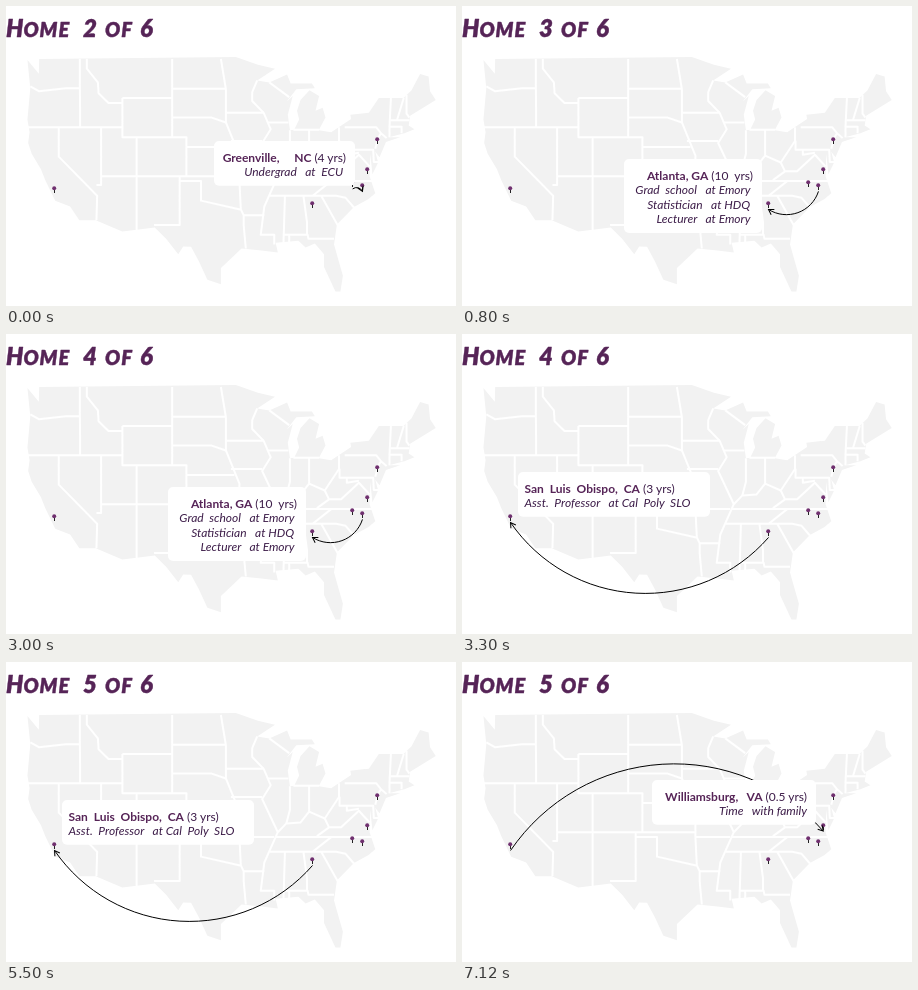
Recreate the animation shown at these times as an HTML page. Size 450 by 300 pixels, loop 8 s.

```html
<!DOCTYPE html>
<html lang="en">
<head>
<meta charset="utf-8">
<title>Home map</title>
<style>
  html, body { margin: 0; width: 100%; height: 100%; overflow: hidden; background: #fff; }
  svg { display: block; width: 450px; height: 300px; }
  text { font-family: Lato, sans-serif; font-size: 12px; fill: #3d1d49; white-space: pre; }
  .heading { font-weight: 900; font-style: italic; fill: #562457; stroke: #562457; stroke-width: .4; stroke-linejoin: round; }
  .big { font-size: 24px; }
  .small { font-size: 20px; letter-spacing: 1px; }
  .bold { font-weight: 700; fill: #562457; }
  .italic { font-style: italic; }
  .land { fill: #f2f2f2; }
  .border { fill: none; stroke: #fff; stroke-width: 2; stroke-linejoin: round; vector-effect: non-scaling-stroke; }
  .arrow { fill: none; stroke: #000; }
  .pin line { stroke: #222; shape-rendering: crispEdges; }
  .pin circle { fill: #70306f; }
</style>
</head>
<body>
<svg viewBox="0 0 450 300">
  <defs>
    <marker id="head" markerUnits="userSpaceOnUse" markerWidth="8" markerHeight="8" refX="6" refY="4" orient="auto">
      <path class="arrow" d="M1 1L6 4L1 7"/>
    </marker>
  </defs>
  <g id="map"></g>
  <g id="pins"></g>
  <g id="scenes"></g>
  <text class="heading" y="31"><tspan class="big" x="0">H</tspan><tspan class="small">OME</tspan><tspan class="big" x="77" id="count">2</tspan><tspan class="small" x="99">OF</tspan><tspan class="big" x="134">6</tspan></text>
</svg>
<script>
// The map is drawn in degrees west and north, with a flat projection to pixels.
const scale = { x: -7.113, y: -9.77, left: 906.3, top: 531.7 };
const project = ([west, north]) => [scale.left + scale.x * west, scale.top + scale.y * north];

const coast = [
  // northern border and lakes
  `124.4 48.9 122.8 47.5 122.75 49 95.1 49.2 92 48.4 89.6 48 92.1 46.8 90.4 46.6 87.9 47.4
   87.4 46.5 84.4 46.5 84 46 86.6 45.9 88 44.6 87.1 45.2 87.8 43.3 87.5 41.7 86.9 41.75
   86.2 42.8 86.5 43.7 86 44.8 84.75 45.8 83.4 45.2 83.9 43.7 82.9 44 82.5 43 83.45 41.7
   81.7 41.5 78.9 42.85 79 43.3 76.4 43.5 75 45`,
  // Atlantic
  `71.5 45 70.4 45.8 69.2 47.45 68 47.2 67.8 45.7 67 44.8 70.6 43.2 70.8 42.2 70 41.8
   71.4 41.4 73.6 41 72 41 74 40.5 74.9 38.95 75.5 39.5 75.1 38.4 75.9 37.2 76.2 39.3
   76.3 37 75.5 35.25 76.5 34.65 78.5 33.85 80.9 32.05 81.3 30 80.05 26.8 80.4 25.2`,
  // Gulf, southern border and Pacific
  `81.1 25.2 82.7 27.7 82.7 29 84 30.1 85.3 29.7 86.3 30.4 89.5 30.2 89.2 29.2 91.5 29.4
   94.3 29.6 97.2 27.6 97.2 25.95 99.1 26.4 100.3 28.3 101.4 29.77 102.5 29.8 103.2 29
   104.9 30.6 106.5 31.75 108.2 31.6 111.07 31.33 114.8 32.5 117.1 32.5 118.4 33.9
   120.5 34.5 121.9 36.6 122.5 37.7 123.8 39.3 124.3 40.4 124.1 41.5 124.4 42.8 124 46`
];

const borders = [
  // straight lines of the west and the plains
  `M124.5 42H111.05 M111.05 44.5V41H102.05V37 M111.05 45H104.05 M111.05 45V44 M104.05 49V41
   M109.05 41V31.3 M114.04 42V36.1H114.7 M120 42V39L114.6 35 114.7 32.5 M114.04 37H94.6
   M117.04 49V46.4L117 44V42 M103 37V32H106.6 M103 36.5H100V34.5L94.5 33.6
   M104.05 45.94H96.5 M104.05 43H98.5L96.5 42.5 M102.05 40H95.3`,
  // mountains and rivers
  `M124 46.2 122.8 45.7 119 46H117 M116.05 49V48L114.5 46.6 114.4 45.5 113 44.5H111.05
   M97.2 49 96.5 45.9V42.5L94.6 39.1V36.5L94.4 33.6 94 33V32L93.7 29.6
   M92.1 46.8 92.8 45.6V44.7L91.2 43.5 90.2 41.8 91.4 40.4 89.2 37 91.1 33.9 91.6 31H89.7V30
   M89.2 37 88 37.9 86 38 84.8 39.1 82.6 38.4 80.6 40.6V42`,
  // midwest and south
  `M96.5 43.5H91.2 M95.8 40.6H91.4 M90.6 42.5H87.7 M90.4 46.6 87.6 45.1 M87.5 41.7V39.3L88 37.9
   M84.8 39.1V41.75 M87 41.75H83.4 M94.6 36.5H89.7 M94 33H91.1 M89.5 36.5H75.8 M90.3 35H83.1
   M88.2 35 88.4 30.2 M85.6 35 85.1 32.3V31 M88.4 31H85L84.9 30.6H81.3 M87.6 31V30
   M84.3 35 81.7 36.5 M83.1 35H81L79.7 34.8 78.5 33.8 M83.1 35 80.8 32`,
  // northeast
  `M83.7 36.6 82 37.5 82.6 38.4 M82 37.5 80.3 37.5 77.8 39.2 76.3 38 M79.5 39.7V39.2L77.8 39.4
   M80.52 40.64V39.72H75.8L75.7 38.46H75 M75.5 39.8 75.1 40.9 74.7 41.4 75.35 42H79.8
   M74.7 41.4 73.9 40.9 M73.5 41V42.05L73.3 45 M73.5 42.05H71.8V41.4 M73.3 42.74H70.7
   M72.45 42.73 71.5 45 M71.1 45.3V43.4L70.7 43`
];

const places = {
  losOsos: [120.66, 35.28],
  atlanta: [84.39, 33.75],
  lehigh: [75.26, 40.3],
  williamsburg: [76.7, 37.27],
  greenville: [77.37, 35.6],
  raleigh: [78.75, 35.85]
};

const { losOsos, atlanta, williamsburg, greenville, raleigh } = places;
const scenes = [
  { from: raleigh, to: greenville, x: 208, y: 135, width: 141,
    bold: 'Greenville,     NC', years: ' (4 yrs)', lines: ['Undergrad   at  ECU '] },
  { from: greenville, to: atlanta, x: 162, y: 153, width: 138,
    bold: 'Atlanta, GA', years: ' (10  yrs)',
    lines: ['Grad  school   at Emory ', 'Statistician   at HDQ ', 'Lecturer   at Emory '] },
  { from: atlanta, to: losOsos, x: 56, y: 138, width: 192, leftAligned: true,
    bold: 'San  Luis  Obispo,  CA', years: ' (3 yrs)', lines: ['Asst.  Professor   at Cal  Poly  SLO'] },
  { from: losOsos, to: williamsburg, x: 190, y: 118, width: 164,
    bold: 'Williamsburg,   VA', years: ' (0.5 yrs)', lines: ['Time   with family'] }
];

const LOOP = 8000, STEP = 2500;
const FIRST_COUNT = 500, FIRST_SCENE = 800;
const LINE_HEIGHT = 14.6;

const byId = id => document.getElementById(id);

function add(parent, tag, attrs, text) {
  const node = document.createElementNS('http://www.w3.org/2000/svg', tag);
  for (const key in attrs) node.setAttribute(key, attrs[key]);
  if (text) node.textContent = text;
  return parent.appendChild(node);
}

function drawMap() {
  const map = byId('map');
  map.setAttribute('transform', `matrix(${scale.x} 0 0 ${scale.y} ${scale.left} ${scale.top})`);
  add(map, 'path', { class: 'land', d: `M${coast.join(' ')}Z` });
  for (const d of borders) add(map, 'path', { class: 'border', d });
}

function drawPin(place) {
  const [x, y] = project(place).map(Math.round);
  const pin = add(byId('pins'), 'g', { class: 'pin' });
  add(pin, 'line', { x1: x + .5, y1: y - 5, x2: x + .5, y2: y });
  add(pin, 'circle', { cx: x + .2, cy: y - 4.8, r: 2 });
}

// A clockwise arc whose height is about a quarter of its span.
function drawArrow(parent, from, to) {
  const [x1, y1] = project(from), [x2, y2] = project(to);
  const radius = .633 * Math.hypot(x2 - x1, y2 - y1);
  add(parent, 'path', {
    class: 'arrow', 'marker-end': 'url(#head)', transform: 'translate(.5 1.5)',
    d: `M${x1} ${y1}A${radius} ${radius} 0 0 1 ${x2} ${y2}`
  });
}

function drawScene({ from, to, x, y, width, leftAligned, bold, years, lines }) {
  const group = add(byId('scenes'), 'g', {});
  drawArrow(group, from, to);
  add(group, 'rect', { x, y, width, height: 15.5 + LINE_HEIGHT * (lines.length + 1), rx: 5, fill: '#fff' });
  const addLine = row => add(group, 'text', {
    x: leftAligned ? x + 6.5 : x + width - 9,
    y: Math.floor(y + 21 + LINE_HEIGHT * row),
    'text-anchor': leftAligned ? 'start' : 'end'
  });
  const title = addLine(0);
  add(title, 'tspan', { class: 'bold' }, bold);
  add(title, 'tspan', {}, years);
  lines.forEach((line, i) => add(addLine(i + 1), 'tspan', { class: 'italic' }, line));
  return group;
}

drawMap();
Object.values(places).forEach(drawPin);
const groups = scenes.map(drawScene);

const stepsSince = (first, time) => Math.floor((time - first) / STEP) + 1;
const origin = performance.now();

function render(now) {
  const time = Math.max(0, now - origin) % LOOP;
  const active = stepsSince(FIRST_SCENE, time);
  groups.forEach((group, i) => group.setAttribute('visibility', i === active ? 'visible' : 'hidden'));
  byId('count').textContent = 2 + stepsSince(FIRST_COUNT, time);
  requestAnimationFrame(render);
}
render(origin);
</script>
</body>
</html>
```
